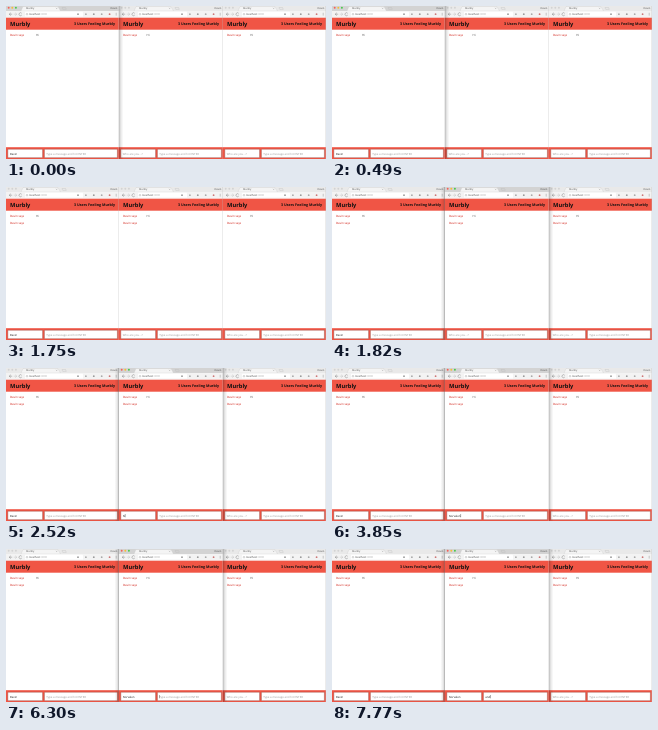
Write an HTML page that moves like this. It is 320 px wide and 153 px high and loops after 8000 ms.

```html
<!DOCTYPE html>
<html lang="en">
<head>
<meta charset="utf-8">
<title>Murbly</title>
<style>
  html, body { margin: 0; width: 100%; height: 100%; overflow: hidden; background: #fff; }
  svg { display: block; width: 100%; height: 100%; }
  text { font-family: "Open Sans", "Noto Sans", sans-serif; text-rendering: geometricPrecision; }
</style>
</head>
<body>
<svg id="stage" viewBox="0 0 320 153" preserveAspectRatio="none">
  <defs>
    <linearGradient id="shade">
      <stop offset="0" stop-color="#000" stop-opacity=".26"/>
      <stop offset=".4" stop-color="#000" stop-opacity=".09"/>
      <stop offset="1" stop-color="#000" stop-opacity="0"/>
    </linearGradient>
  </defs>
</svg>
<script>
const LOOP = 8000;
const RED = '#f05545', INK = '#1c1c1c', HINT = '#999', FIELD_EDGE = '#8a4840';
const APP = 'Murbly', USER = 'Davin', GUEST = 'Norvalen', REPLY = 'and';
const NAME_HINT = 'Who are you...?', MESSAGE_HINT = 'Type a message and hit ENTER';

const SENT = 1540, BROADCAST = 1610, BLUR = 1750, FOCUS = 1820, TAB_KEY = 4270;
const GUEST_KEYS = [2520, 2800, 3010, 3220, 3430, 3570, 3780, 3850];
const REPLY_KEYS = [7420, 7700, 7770];
const CARET_FLIPS = [4760, 5250, 5810, 6300, 6860, 7420];

const stage = document.getElementById('stage');

function add(parent, tag, attrs) {
  const node = document.createElementNS('http://www.w3.org/2000/svg', tag);
  for (const key in attrs) node.setAttribute(key, attrs[key]);
  parent.appendChild(node);
  return node;
}
const rect = (p, x, y, width, height, fill, extra = {}) =>
  add(p, 'rect', { x, y, width, height, fill, ...extra });
const path = (p, d, stroke = '#777', width = .45) =>
  add(p, 'path', { d, stroke, 'stroke-width': width, fill: 'none' });
function text(p, x, y, size, fill, value, extra = {}) {
  const node = add(p, 'text', { x, y, 'font-size': size, fill, ...extra });
  node.textContent = value;
  return node;
}
const field = (p, x, width) =>
  rect(p, x, 143.2, width, 8.5, '#fff', { rx: .4, stroke: FIELD_EDGE, 'stroke-width': .4 });
const show = (node, visible) => node.setAttribute('visibility', visible ? 'visible' : 'hidden');
const countPast = (times, t) => times.filter(time => t >= time).length;

function setField(node, value, hint) {
  node.textContent = value || hint;
  node.setAttribute('fill', value ? INK : HINT);
}

function makeWindow(x, width) {
  const g = add(stage, 'g', { transform: `translate(${x} 0)` });
  rect(g, 0, 0, width, 153, '#fff');

  // Browser chrome
  const strip = rect(g, 0, 0, width, 5, '#e9e9e9');
  const lights = [2.7, 6.3, 9.9].map(cx => add(g, 'circle', { cx, cy: 1.8, r: .95 }));
  add(g, 'path', { d: 'M15 5 L17 .5 H52 L54.5 5Z', fill: '#f4f4f4', stroke: '#c4c4c4', 'stroke-width': .3 });
  text(g, 20, 3.3, 2.5, '#555', APP);
  path(g, 'M50 1.7l1.3 1.3m0-1.3l-1.3 1.3', '#999', .3);
  path(g, 'M56 1.5h3.5l.8 1.9h-3.5z', '#b5b5b5', .3);
  text(g, width - 1.8, 2.7, 2.5, '#444', USER, { 'text-anchor': 'end' });
  rect(g, 0, 5, width, 6.6, '#f3f3f3');
  path(g, 'M4.8 6.8l-1.6 1.4 1.6 1.4M3.2 8.2h3');
  path(g, 'M9.2 6.8l1.6 1.4-1.6 1.4M7.8 8.2h3', '#bbb');
  path(g, 'M15.7 7.3a1.5 1.5 0 1 0 .1 1.7');
  rect(g, 19, 5.8, width - 55, 4.8, '#fff', { rx: .7 });
  add(g, 'circle', { cx: 21, cy: 8.2, r: .8, fill: 'none', stroke: '#888', 'stroke-width': .35 });
  const url = text(g, 23, 9.2, 2.7, '#444', 'localhost');
  add(url, 'tspan', { fill: '#aaa' }).textContent = ':3000';
  ['#999', '#aaa', '#999', '#aaa', '#c77'].forEach((fill, i) =>
    add(g, 'circle', { cx: width - 41 + i * 7.9, cy: 8.2, r: .9, fill }));
  path(g, `M${width - 2.8} 6.8v2.8`, '#888');

  // Page
  rect(g, 0, 11.7, width, 12, RED);
  text(g, 4.1, 19.6, 5.7, '#111', APP, { 'font-weight': 700 });
  text(g, width - 4, 18.8, 3.65, '#111', `3 Users Feeling ${APP}`, { 'text-anchor': 'end', 'font-weight': 700 });
  const says = y => text(g, 4, y, 2.9, '#cf1c12', `${USER} says`);
  says(29.9);
  text(g, width * .265, 29.9, 2.9, '#444', 'Hi');
  const second = says(36.9);

  rect(g, 0, 141.2, width, 11.8, RED);
  field(g, 1.8, 34.8);
  field(g, 38.4, width - 40);
  const name = text(g, 3.7, 148.8, 2.8, HINT, NAME_HINT);
  const message = text(g, 40.2, 148.8, 2.8, HINT, MESSAGE_HINT);
  const caret = rect(g, 0, 146, .35, 3.3, INK);
  path(g, `M${width - .2} 0V153`, '#bbb', .4);

  return { strip, lights, second, name, message, caret };
}

const panes = [makeWindow(0, 113), makeWindow(113, 104), makeWindow(217, 103)];
const shadow = (x, side) => add(stage, 'rect', {
  width: 4.5, height: 153, fill: 'url(#shade)',
  transform: `translate(${x} 0) scale(${side} 1)`
});
const shadows = [[shadow(113, 1)], [shadow(113, -1), shadow(217, 1)]];

setField(panes[0].name, USER, '');

function placeCaret(pane, node, typed, visible) {
  const start = Number(node.getAttribute('x'));
  pane.caret.setAttribute('x', start + (typed ? node.getComputedTextLength() + .1 : -.2));
  show(pane.caret, visible);
}

function render(t) {
  const focused = [t < BLUR, t >= FOCUS, false];
  panes.forEach((pane, i) => {
    pane.strip.setAttribute('fill', focused[i] ? '#d3d3d3' : '#e9e9e9');
    pane.lights.forEach((light, n) =>
      light.setAttribute('fill', focused[i] ? ['#f65f57', '#f8bd35', '#45c94b'][n] : '#d3d3d3'));
    show(pane.second, t >= (i ? BROADCAST : SENT));
    show(pane.caret, false);
  });
  shadows.forEach((group, i) => group.forEach(node => show(node, focused[i])));

  const [first, second] = panes;
  const guest = GUEST.slice(0, countPast(GUEST_KEYS, t));
  const reply = REPLY.slice(0, countPast(REPLY_KEYS, t));
  setField(second.name, guest, NAME_HINT);
  setField(second.message, reply, MESSAGE_HINT);

  if (t < BLUR) {
    placeCaret(first, first.message, '', t >= 560 && t < 1120);
  } else if (t >= TAB_KEY) {
    placeCaret(second, second.message, reply, countPast(CARET_FLIPS, t) % 2 === 0);
  } else if (t >= 2100) {
    placeCaret(second, second.name, guest, true);
  }
}

const began = performance.now();
function tick() {
  render((performance.now() - began) % LOOP);
  requestAnimationFrame(tick);
}
tick();
</script>
</body>
</html>
```
